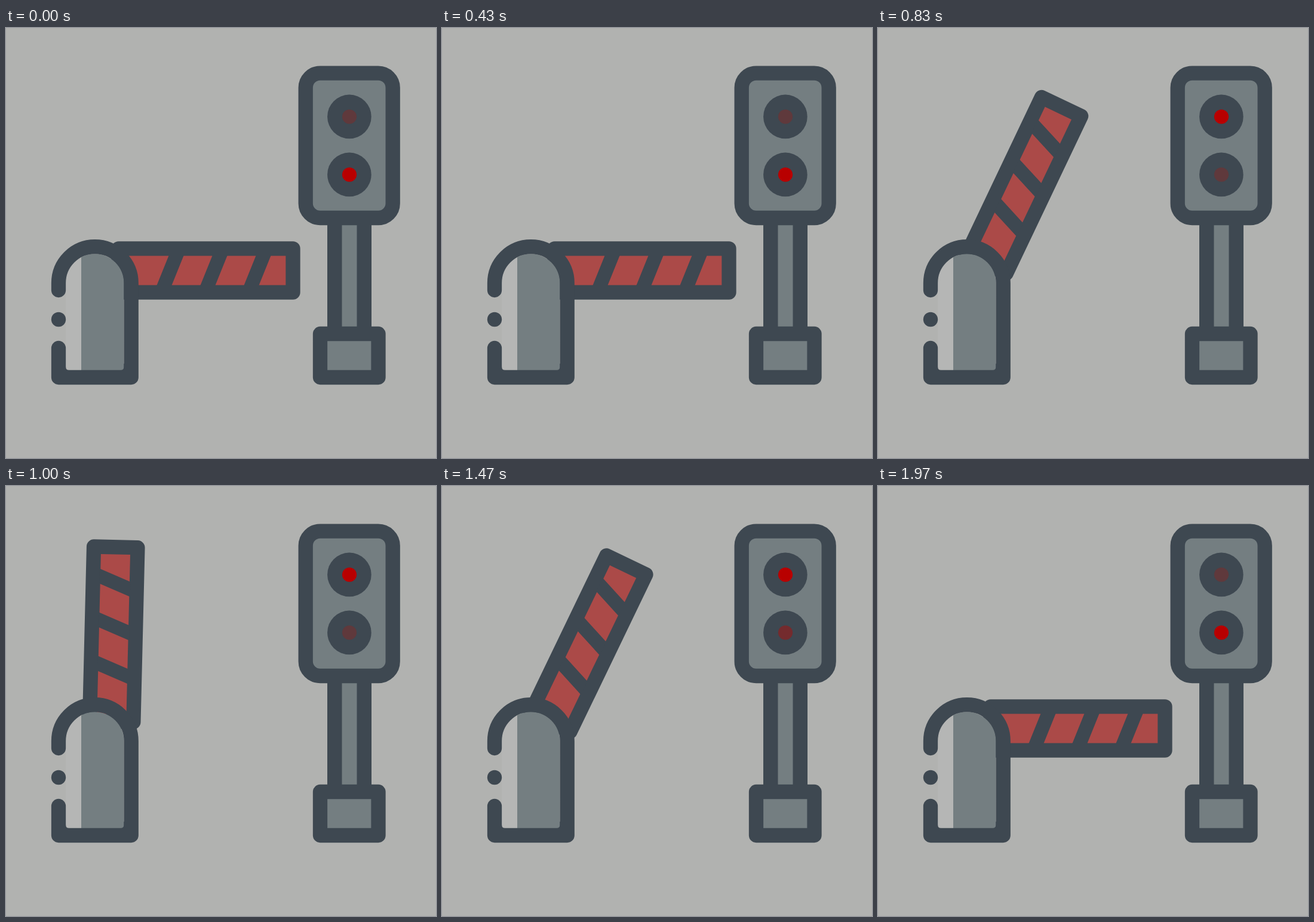
Recreate the animation shown at these times as an HTML page. Size 720x720 px, loop 2.01 s.

```html
<!DOCTYPE html>
<html lang="en">
<head>
<meta charset="utf-8">
<title>Railway crossing</title>
<style>
  html, body { margin: 0; height: 100%; overflow: hidden; background: #b1b2b0; }
  svg { display: block; width: 100vw; height: 100vh; }
  .line { stroke: #3e4851; stroke-width: 24.3; stroke-linejoin: round; stroke-linecap: round; }
  .dark { fill: #3e4851; }
  .grey { fill: #747e81; }
</style>
</head>
<body>
<svg viewBox="0 0 720 720">
  <defs>
    <clipPath id="inside">
      <path d="M100 427a48.7 48.7 0 0 1 97.4 0V567q0 6-6 6H106q-6 0-6-6z"/>
    </clipPath>
  </defs>

  <g id="barrier">
    <rect class="line" x="188.5" y="369.3" width="292" height="73.4" fill="#ab4a48"/>
    <path class="dark" d="M273 380h25l-21 52h-25zM346 380h25l-21 52h-25zM419 380h25l-21 52h-25z"/>
  </g>

  <!-- barrier housing -->
  <path class="dark" d="M94 562h109v20H94z"/>
  <g clip-path="url(#inside)">
    <path fill="#b5b6b5" d="M100 370h26v210h-26z"/>
    <path class="grey" d="M126 370h72v210h-72z"/>
  </g>
  <path class="line" fill="none" d="M88 536V585H209.7V427A60.85 60.85 0 0 0 88 427V439"/>
  <circle class="dark" cx="88" cy="488" r="12.2"/>

  <!-- signal -->
  <path class="dark" d="M538 320h74v190h-74z"/>
  <path class="grey" d="M562.5 320h25v190h-25z"/>
  <rect class="line grey" x="526" y="512" width="97.5" height="73"/>
  <rect class="line grey" x="501.7" y="75.6" width="146" height="242.4" rx="24.3"/>
  <circle class="dark" cx="574.9" cy="148.4" r="36.8"/>
  <circle class="dark" cx="574.9" cy="245.4" r="36.8"/>
  <circle id="upper" cx="575" cy="148.5" r="12.1"/>
  <circle id="lower" cx="575" cy="245.5" r="12.1"/>
</svg>
<script>
  const LOOP = 2010;
  const OFF = [95, 57, 60], ON = [184, 0, 0];
  const [barrier, upper, lower] = ['barrier', 'upper', 'lower'].map(id => document.getElementById(id));

  const ramp = (t, from, to) => Math.min(1, Math.max(0, (t - from) / (to - from)));
  const ease = x => x * x * (3 - 2 * x);
  const light = (lamp, k) =>
    lamp.setAttribute('fill', `rgb(${OFF.map((c, i) => Math.round(c + (ON[i] - c) * k))})`);

  function draw() {
    const t = performance.now() % LOOP;
    const lift = ease(ramp(t, 433, 1046)) - ease(ramp(t, 1340, 1711));
    barrier.setAttribute('transform', `rotate(${-90 * lift} 176.6 406.2)`);
    light(upper, ramp(t, 435, 565) - ramp(t, 1570, 1700));
    light(lower, 1 - ramp(t, 565, 695) + ramp(t, 1440, 1570));
    requestAnimationFrame(draw);
  }
  draw();
</script>
</body>
</html>
```
